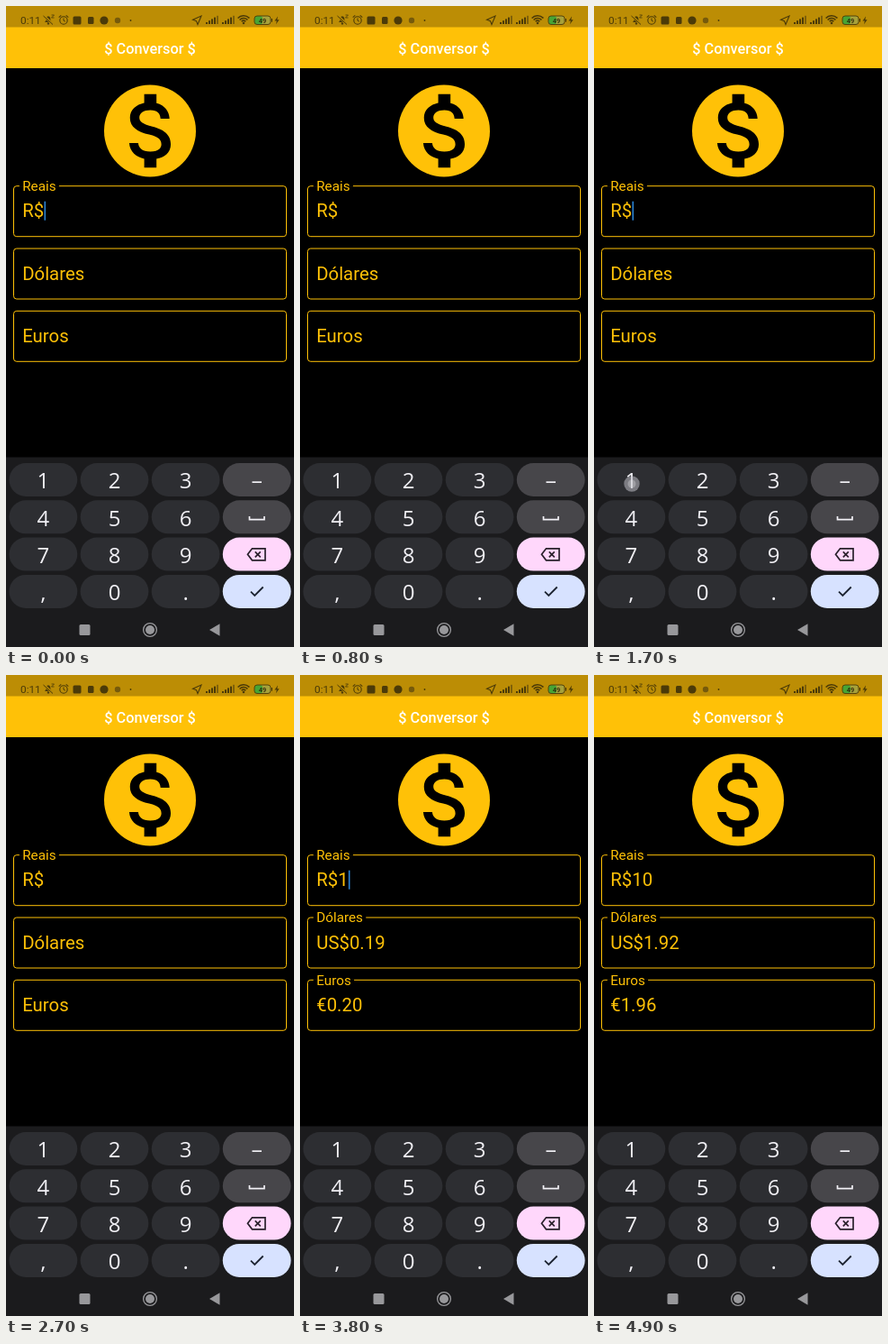
Animation, 320 px wide and 711 px high, one loop 5 s. Source, as an HTML page with a canvas:

```html
<!DOCTYPE html>
<html lang="pt">
<head>
<meta charset="utf-8">
<title>Conversor</title>
<style>
html, body { margin: 0; width: 100%; height: 100%; overflow: hidden; background: #000; }
canvas { display: block; width: 320px; height: 711px; }
</style>
</head>
<body>
<canvas id="stage"></canvas>
<script>
const W = 320, H = 711, LOOP = 5000, STEP = 100;
const AMBER = '#ffc107', INK = '#4b3a08';
const TEXT_SIZE = 20.36, LABEL_SIZE = TEXT_SIZE * 0.75;
const TYPE_ONE = 3500, TYPE_ZERO = 4200, BLINK = 700;

const canvas = document.getElementById('stage');
const ctx = canvas.getContext('2d');
const ratio = window.devicePixelRatio || 1;
canvas.width = W * ratio;
canvas.height = H * ratio;

// Dollar sign of the coin, on a 24-unit grid
const dollar = new Path2D('M13.41 18.09V20h-2.67v-1.93c-1.71-.36-3.16-1.46-3.27-3.4h1.96c.1 1.05.82 1.87 2.65 1.87 ' +
  '1.96 0 2.4-.98 2.4-1.59 0-.83-.44-1.61-2.67-2.14-2.48-.6-4.18-1.62-4.18-3.67 0-1.72 1.39-2.84 3.11-3.21V4h2.67v1.95' +
  'c1.86.45 2.79 1.86 2.85 3.39H14.3c-.05-1.11-.64-1.87-2.22-1.87-1.5 0-2.4.68-2.4 1.64 0 .84.65 1.39 2.67 1.91' +
  's4.18 1.39 4.18 3.91c-.01 1.83-1.38 2.83-3.12 3.16z');

const touches = [
  { from: 1700, to: 1900, x: 42, y: 530, key: -1 },
  { from: 3200, to: 3500, x: 32, y: 530, key: 0 },
  { from: 4000, to: 4200, x: 120, y: 652, key: 13 }
];

const mix = (a, b, p) => a + (b - a) * p;
const between = (t, a, b) => t >= a && t < b;
const ease = p => {
  p = Math.min(1, Math.max(0, p));
  return p * p * (3 - 2 * p);
};

function rect(x, y, w, h, color) {
  ctx.fillStyle = color;
  ctx.fillRect(x, y, w, h);
}

function pill(x, y, w, h, r, color) {
  ctx.fillStyle = color;
  ctx.beginPath();
  ctx.roundRect(x, y, w, h, r);
  ctx.fill();
}

function disc(x, y, r, color) {
  ctx.fillStyle = color;
  ctx.beginPath();
  ctx.arc(x, y, r, 0, Math.PI * 2);
  ctx.fill();
}

function ring(x, y, r, color, width) {
  ctx.strokeStyle = color;
  ctx.lineWidth = width;
  ctx.beginPath();
  ctx.arc(x, y, r, 0, Math.PI * 2);
  ctx.stroke();
}

function trace(points, close) {
  ctx.beginPath();
  points.forEach(([x, y]) => ctx.lineTo(x, y));
  if (close) ctx.closePath();
}

function line(points, color, width, close) {
  ctx.strokeStyle = color;
  ctx.lineWidth = width;
  trace(points, close);
  ctx.stroke();
}

function shape(points, color) {
  ctx.fillStyle = color;
  trace(points, true);
  ctx.fill();
}

function text(str, x, y, size, color, align = 'left', family = 'Roboto', weight = 400) {
  ctx.font = `${weight} ${size}px ${family}, sans-serif`;
  ctx.textAlign = align;
  ctx.fillStyle = color;
  ctx.fillText(str, x, y);
  return ctx.measureText(str).width;
}

function drawBell() {
  shape([[43, 18], [44.5, 16], [44.8, 13], [46, 11.5], [48, 11.5], [49.2, 13], [49.5, 16], [51, 18]], INK);
  disc(47, 19.4, 1.2, INK);
  line([[42, 11], [52.5, 20.5]], '#bc8d05', 2.4);
  line([[41.5, 11], [52, 20.5]], INK, 1);
  line([[50.5, 10], [53.5, 10], [50.5, 13], [53.5, 13]], INK, 0.8);
}

function drawAlarm() {
  ring(64, 16, 4.2, INK, 1.1);
  line([[64, 13.5], [64, 16.2], [65.8, 17.2]], INK, 1);
  line([[58.7, 12.6], [61.3, 10.4]], INK, 1.1);
  line([[66.7, 10.4], [69.3, 12.6]], INK, 1.1);
}

function drawSignal(x) {
  for (let i = 0; i < 5; i++) rect(x + i * 3, 18 - i * 1.8, 2, 2 + i * 1.8, i < 4 ? INK : '#806109');
}

function drawWifi() {
  ctx.strokeStyle = INK;
  ctx.lineWidth = 1.5;
  for (const r of [3.2, 6, 8.8]) {
    ctx.beginPath();
    ctx.arc(264, 19.5, r, -Math.PI * 0.76, -Math.PI * 0.24);
    ctx.stroke();
  }
  disc(264, 19, 1.3, INK);
}

function drawBattery() {
  pill(276, 11, 18, 9.5, 3, '#a7a13a');
  pill(276, 11, 9, 9.5, 3, '#47a435');
  ctx.strokeStyle = INK;
  ctx.lineWidth = 0.9;
  ctx.beginPath();
  ctx.roundRect(276, 11, 18, 9.5, 3);
  ctx.stroke();
  rect(294.8, 14, 1.2, 3.6, INK);
  text('49', 285, 18.5, 7.5, '#2b2608', 'center', 'Roboto', 500);
  shape([[302, 11.5], [298.5, 16.4], [300.8, 16.4], [300, 20.3], [303.6, 15.2], [301.3, 15.2]], INK);
}

function drawStatus() {
  rect(0, 0, W, 24, '#bc8d05');
  text('0:11', 16, 19.8, 11.8, INK);
  drawBell();
  drawAlarm();
  pill(74.5, 11.5, 9, 9, 1.5, INK);
  pill(91, 12, 6.5, 8, 1.5, INK);
  disc(109, 16, 4.6, INK);
  disc(124, 16, 3.2, '#765a0b');
  disc(138.5, 16, 0.9, INK);
  line([[207.5, 15.2], [217, 11], [213, 20.5], [211.5, 16.7]], INK, 1.1, true);
  drawSignal(222);
  drawSignal(240);
  drawWifi();
  drawBattery();
}

function drawHeader() {
  rect(0, 23.5, W, 45.5, AMBER);
  text('$ Conversor $', 160, 53, 16.3, '#fff', 'center', 'Roboto', 500);
  disc(160, 138.5, 51, AMBER);
  ctx.save();
  ctx.translate(160, 138.5);
  ctx.scale(5.09, 5.09);
  ctx.translate(-12, -12);
  ctx.fillStyle = '#000';
  ctx.fill(dollar);
  ctx.restore();
}

// Outlined field; float goes from 0 (label inside) to 1 (label on the border)
function drawField(top, label, prefix, value, float, caret) {
  const x = 18.2;
  ctx.strokeStyle = AMBER;
  ctx.lineWidth = 1;
  ctx.beginPath();
  ctx.roundRect(8.5, top, 303, 56, 3.3);
  ctx.stroke();
  if (float > 0) {
    ctx.font = `${LABEL_SIZE}px Roboto, sans-serif`;
    const gap = ctx.measureText(label).width + 6.6;
    rect(x - 3.3, top - 1, gap * float, 2, '#000');
  }
  text(label, x, top + mix(34.5, 5.2, float), mix(TEXT_SIZE, LABEL_SIZE, float), AMBER);
  ctx.globalAlpha = float;
  const wide = text(prefix + value, x, top + 34.5, TEXT_SIZE, AMBER);
  ctx.globalAlpha = 1;
  if (caret) rect(x + wide + 0.3, top + 17, 1.6, 21, '#2a83d4');
}

function caretOn(t) {
  if (t >= TYPE_ZERO) return t < TYPE_ZERO + BLINK;
  if (t >= TYPE_ONE) return true;
  return Math.floor((t + BLINK - STEP) / BLINK) % 2 === 1 || t < STEP;
}

function drawFields(t) {
  const typed = t < TYPE_ONE ? 0 : t < TYPE_ZERO ? 1 : 2;
  const float = typed ? ease((t - TYPE_ONE + 50) / 167) : 0;
  drawField(199.7, 'Reais', 'R$', ['', '1', '10'][typed], 1, caretOn(t));
  drawField(269, 'Dólares', 'US$', ['', '0.19', '1.92'][typed], float, false);
  drawField(338.3, 'Euros', '€', ['', '0.20', '1.96'][typed], float, false);
}

function drawKeyboard(t) {
  rect(0, 500.5, W, H - 500.5, '#1b1b1d');
  const touch = touches.find(d => between(t, d.from, d.to));
  const glyphs = ['123', '456', '789', ',0.'];
  const side = ['#47464a', '#47464a', '#ffd7fb', '#d7e2ff'];
  for (let row = 0; row < 4; row++) {
    const y = 507 + row * 41.3;
    for (let col = 0; col < 4; col++) {
      const x = 3.5 + col * 79.1;
      const held = touch && col < 3 && touch.key === row * 4 + col - (row === 3 ? 0 : row);
      const pressed = held || (touch && touch.key === 13 && row === 3 && col === 1);
      pill(x, y, 75.8, 37, 18.5, col === 3 ? side[row] : pressed ? '#a5a8bf' : '#2d2e32');
      if (col < 3) text(glyphs[row][col], x + 37.9, y + 28.4, 24, '#f1f0f5', 'center', '"Open Sans"');
    }
  }
  rect(273.5, 527.3, 10.5, 1.7, '#f1f0f5');
  line([[270.5, 566], [270.5, 569.7], [287, 569.7], [287, 566]], '#f1f0f5', 1.7);
  line([[268.5, 608.3], [273.5, 601.8], [288, 601.8], [288, 614.8], [273.5, 614.8]], '#29202b', 1.7, true);
  line([[276.8, 605.3], [282.8, 611.3]], '#29202b', 1.7);
  line([[282.8, 605.3], [276.8, 611.3]], '#29202b', 1.7);
  line([[272, 649.7], [276.3, 654], [285.7, 644.5]], '#1b2230', 1.8);
  if (touch) {
    disc(touch.x, touch.y, 8.7, touch.key < 0 ? 'rgba(190,190,196,.55)' : 'rgba(225,225,230,.75)');
    if (touch.key < 0) disc(touch.x, touch.y, 4.5, 'rgba(225,225,230,.35)');
  }
}

function drawNav() {
  const grey = '#98989b';
  pill(81.5, 686, 12, 12, 1.5, grey);
  ring(160, 692, 7.4, grey, 1.3);
  disc(160, 692, 5, grey);
  shape([[226, 692], [237.5, 685.3], [237.5, 698.7]], grey);
}

function draw(now) {
  const t = Math.floor((now % LOOP) / STEP) * STEP;
  ctx.setTransform(ratio, 0, 0, ratio, 0, 0);
  rect(0, 0, W, H, '#000');
  drawStatus();
  drawHeader();
  drawFields(t);
  drawKeyboard(t);
  drawNav();
}

let start;
function loop(now) {
  if (start === undefined) start = now;
  draw(Math.max(0, now - start));
  requestAnimationFrame(loop);
}
draw(0);
requestAnimationFrame(loop);
</script>
</body>
</html>
```
